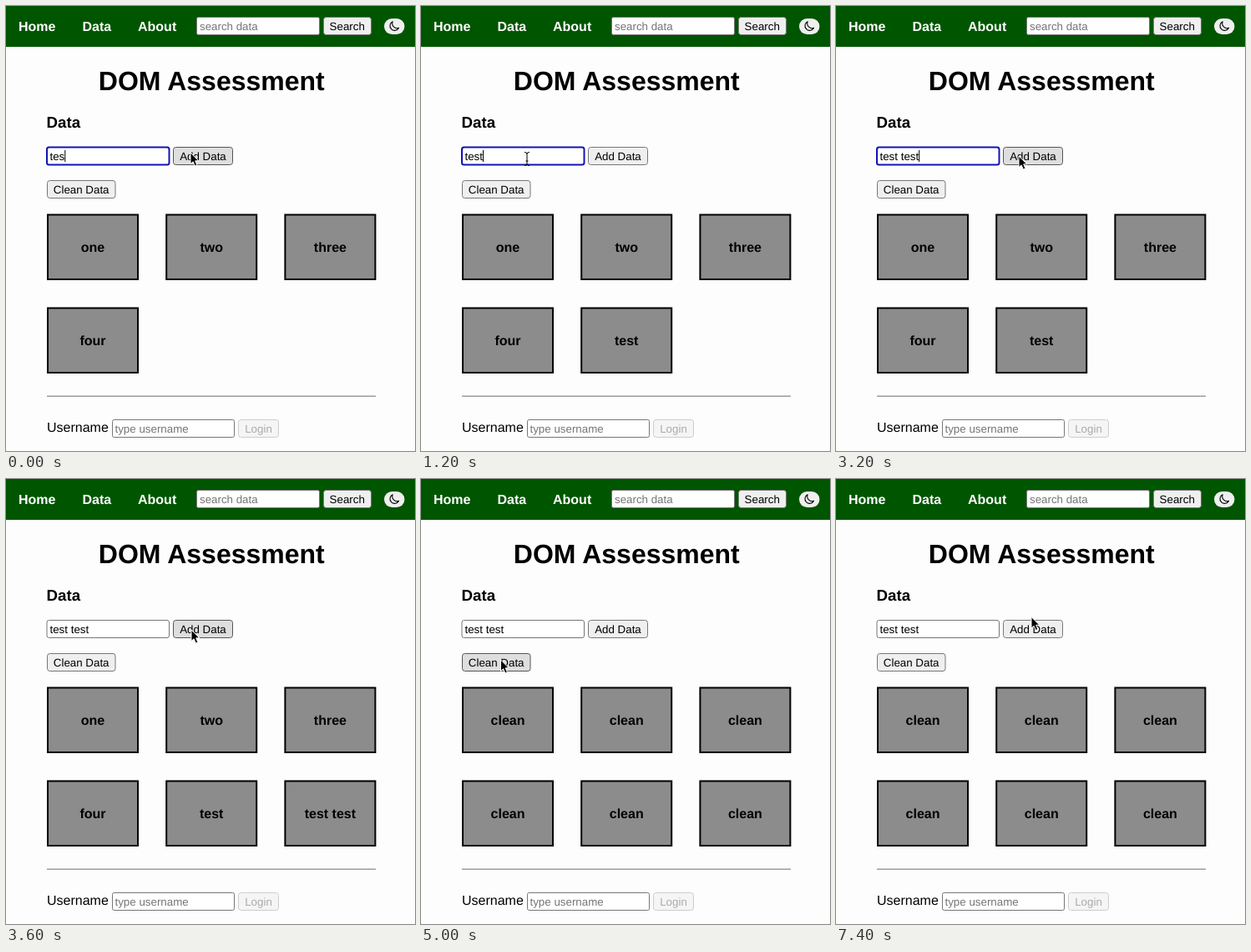
An HTML page for the animation above (7500 ms loop, 490 px wide and 534 px high).

```html
<!DOCTYPE html>
<html lang="en">
<head>
<meta charset="utf-8">
<title>DOM Assessment</title>
<style>
  html, body { margin: 0; width: 100%; height: 100%; overflow: hidden; background: #fdfdfd; }
  svg { display: block; width: 490px; height: 534px; }
  text { font: 13.333px "Liberation Sans", Arial, sans-serif; text-rendering: geometricPrecision; white-space: pre; }
  .nav text { font-size: 16px; font-weight: bold; fill: #fff; }
  .label { font-size: 16px; }
  .heading { font-size: 18.72px; font-weight: bold; }
  .title { font-size: 32px; font-weight: bold; }
  .mid, .button text, .card text { text-anchor: middle; }
  .hint { fill: #757575; }
  .field rect { fill: #fff; stroke: #767676; }
  .field.focus rect { stroke: #1212b4; stroke-width: 2; }
  .button rect { fill: #efefef; stroke: #767676; }
  .button.hover rect { fill: #dedede; stroke: #555; }
  .button.press rect { fill: #f0f0f0; stroke: #777; }
  .button.off rect { fill: #f5f5f5; stroke: #cdcdcd; }
  .button.off text { fill: #ababab; }
  .card rect { fill: #8c8c8c; stroke: #000; stroke-width: 2; }
  .card text { font-size: 16px; font-weight: bold; }
</style>
</head>
<body>
<svg viewBox="0 0 490 534">
  <rect width="490" height="534" fill="#fdfdfd"/>
  <rect width="490" height="49" fill="#005500"/>
  <g class="nav">
    <text x="15" y="29.5">Home</text>
    <text x="91.5" y="29.5">Data</text>
    <text x="158" y="29.5">About</text>
  </g>
  <g class="field">
    <rect x="228.5" y="13.5" width="147" height="21" rx="2"/>
    <text class="hint" x="232" y="28.5">search data</text>
  </g>
  <g class="button">
    <rect x="380.5" y="13.5" width="57" height="21" rx="3"/>
    <text x="408.7" y="28.5">Search</text>
  </g>
  <rect x="453" y="15" width="24.5" height="19" rx="9.5" fill="#efefef"/>
  <path d="M463.2 18.7A5.6 5.6 0 1 0 470.6 26.3A5.8 5.8 0 0 1 463.2 18.7Z" fill="none" stroke="#000" stroke-width="1.1" stroke-linejoin="round"/>

  <text class="title mid" x="246.3" y="100.5">DOM Assessment</text>
  <text class="heading" x="48.5" y="146.3">Data</text>
  <g class="field" id="field">
    <rect x="49" y="169.5" width="146.5" height="21" rx="2.5"/>
    <text x="52.5" y="184.5"></text>
  </g>
  <rect id="caret" y="173" width="1" height="14"/>
  <g class="button" id="add">
    <rect x="200.5" y="169.5" width="71" height="21" rx="3"/>
    <text x="236" y="184.5">Add Data</text>
  </g>
  <g class="button" id="clean">
    <rect x="49.5" y="209.5" width="81.5" height="21" rx="3"/>
    <text x="90.2" y="224.5">Clean Data</text>
  </g>
  <g id="cards"></g>
  <rect x="49" y="467.5" width="394" height="1.5" fill="#9c9c9c"/>
  <text class="label" x="49" y="511.3">Username</text>
  <g class="field">
    <rect x="127.5" y="496.5" width="146" height="21" rx="2"/>
    <text class="hint" x="130.5" y="511.5">type username</text>
  </g>
  <g class="button off">
    <rect x="278.5" y="496.5" width="48" height="21" rx="3"/>
    <text x="302.5" y="511.5">Login</text>
  </g>
  <g id="pointer">
    <path id="arrow" d="M0 0V13.6L3.1 10.8L5.3 16L7.9 14.9L5.7 9.8H9.8Z" fill="#000" stroke="#fff"/>
    <path id="beam" d="M-3 -7.5Q0 -7.5 0 -5.5Q0 -7.5 3 -7.5M0 -5.5V6.5M-3 8.5Q0 8.5 0 6.5Q0 8.5 3 8.5M-1.5 3H1.5" fill="none" stroke="#000"/>
  </g>
</svg>
<script>
  const LOOP = 7500, STEP = 100;
  const $ = id => document.getElementById(id);
  const field = $('field'), input = field.querySelector('text'), caret = $('caret');

  // Pointer path: time, x, y
  const path = [
    [0, 221, 176], [700, 221, 176], [1000, 131, 181], [1200, 127, 183],
    [3000, 127, 183], [3200, 219, 180], [3300, 222, 181], [3800, 222, 181],
    [4400, 95.5, 217], [5400, 95.5, 217], [6200, 97, 221], [6400, 98.5, 222],
    [6900, 99, 222.5], [7400, 234, 165.5]
  ];
  const typed = [[0, 'tes'], [100, 'test'], [2300, 'test '], [2600, 'test t'],
    [2700, 'test te'], [2900, 'test tes'], [3000, 'test test']];
  const focusSpans = [[0, 500], [1100, 3500]];
  const hiddenSpan = [2300, 3000];
  const addPress = [[500, 600], [3500, 3600]];
  const cleanPress = [[4600, 4700]];
  const names = ['one', 'two', 'three', 'four', 'test', 'test test'];
  const shownAt = [0, 0, 0, 0, 600, 3600], cleanedAt = 4700;

  const pen = document.createElement('canvas').getContext('2d');
  pen.font = '13.333px "Liberation Sans", Arial, sans-serif';

  $('cards').innerHTML = names.map((_, i) => {
    const x = 49 + i % 3 * 142.2, y = 249.5 + Math.floor(i / 3) * 112;
    return `<g class="card"><rect x="${x + 1}" y="${y + 1}" width="108" height="77.5"/>
      <text x="${x + 55}" y="${y + 45.3}"></text></g>`;
  }).join('');
  const cards = [...document.querySelectorAll('.card')];

  const within = (t, spans) => spans.find(([a, b]) => t >= a && t < b);
  const ease = k => k * k * (3 - 2 * k);

  function pointerAt(t) {
    const i = path.findIndex(p => p[0] > t);
    if (i < 0) return path[path.length - 1].slice(1);
    const [t0, x0, y0] = path[i - 1], [t1, x1, y1] = path[i];
    const k = ease((t - t0) / (t1 - t0));
    return [x0 + (x1 - x0) * k, y0 + (y1 - y0) * k];
  }

  function over(group, x, y) {
    const b = group.querySelector('rect').getBBox();
    return x >= b.x && x <= b.x + b.width && y >= b.y && y <= b.y + b.height;
  }

  function show(el, on) {
    el.style.display = on ? '' : 'none';
  }

  function draw(t) {
    const [x, y] = pointerAt(t);
    const hidden = within(t, [hiddenSpan]);
    const inField = over(field, x, y);
    show($('pointer'), !hidden);
    show($('arrow'), !inField);
    show($('beam'), inField);
    $('pointer').setAttribute('transform', `translate(${x} ${y})`);

    const [keyAt, value] = typed.filter(k => k[0] <= t).pop();
    const focus = within(t, focusSpans);
    input.textContent = value;
    field.classList.toggle('focus', !!focus);
    caret.setAttribute('x', 52.5 + pen.measureText(value).width);
    show(caret, focus && (t - Math.max(keyAt, focus[0])) % 1000 < 500);

    for (const [id, presses] of [['add', addPress], ['clean', cleanPress]]) {
      const button = $(id);
      button.classList.toggle('hover', over(button, x, y));
      button.classList.toggle('press', !!within(t, presses));
    }

    cards.forEach((card, i) => {
      show(card, t >= shownAt[i]);
      card.querySelector('text').textContent = t < cleanedAt ? names[i] : 'clean';
    });
  }

  const start = performance.now();
  function tick() {
    const t = (performance.now() - start) % LOOP;
    draw(Math.floor(t / STEP) * STEP);
    requestAnimationFrame(tick);
  }
  tick();
</script>
</body>
</html>
```
